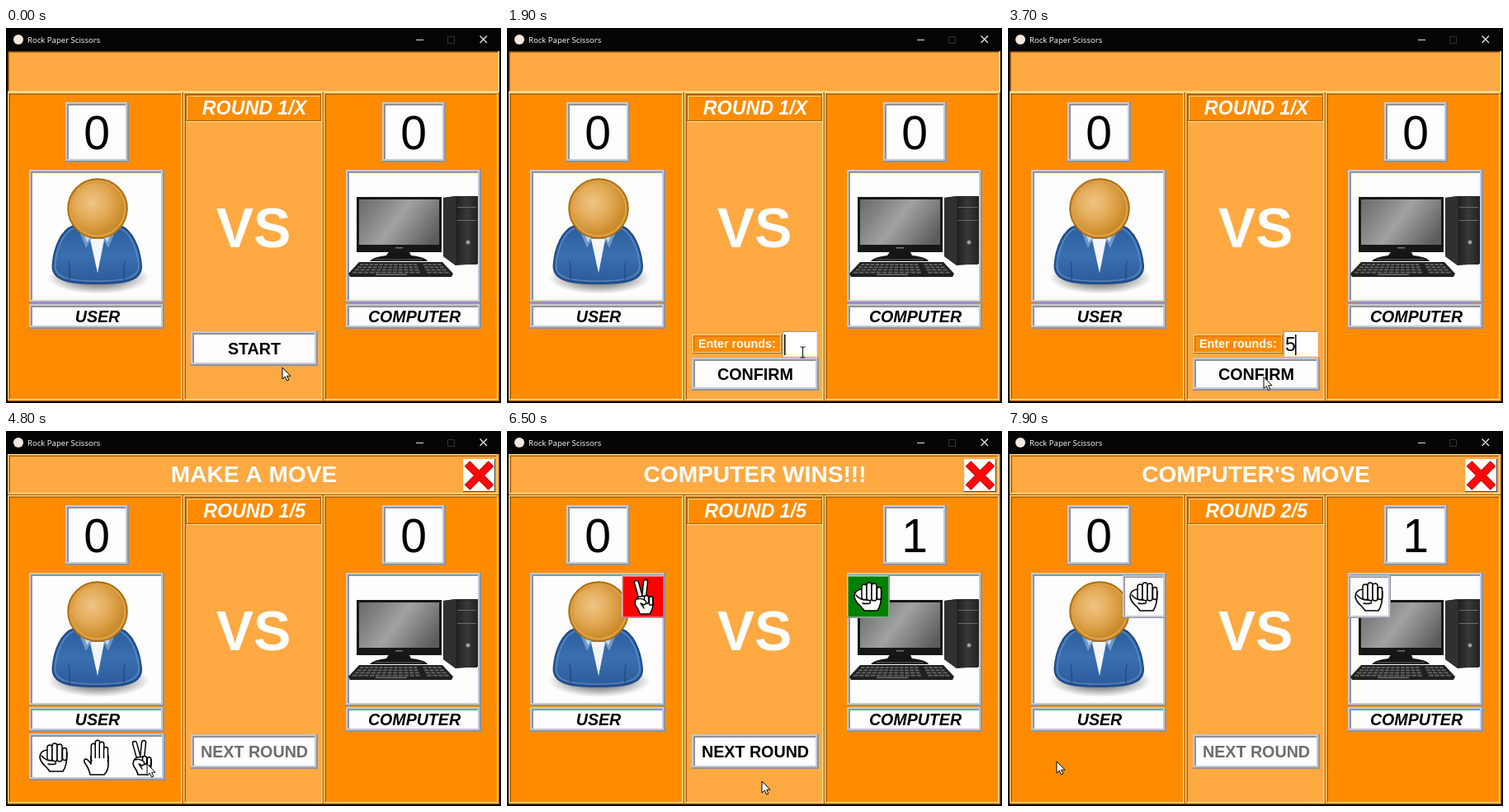
An HTML page with a canvas for the animation above (8000 ms loop, 600 by 455 pixels).

```html
<!DOCTYPE html>
<html lang="en">
<head>
<meta charset="utf-8">
<title>Rock Paper Scissors</title>
<style>
html, body { margin: 0; width: 100%; height: 100%; overflow: hidden; background: #000; }
canvas { display: block; width: 600px; height: 455px; }
</style>
</head>
<body>
<canvas id="stage" width="600" height="455"></canvas>
<script>
const ctx = document.getElementById('stage').getContext('2d');
const LOOP = 8000;
const SANS = '"Liberation Sans", Arial, sans-serif';
const DARK_ORANGE = '#ff8c00', ORANGE = '#ffa943';
const WARM = ['#ffe08f', '#a86000'], COOL = ['#c3c8d3', '#8f939d'];

// Moments at which the game changes
const T = { start: 800, focus: 1700, type: 2300, confirm: 3800, pick1: 5000, win: 6400, next: 7000, pick2: 7600 };

// Pointer path: time, x, y
const PATH = [
  [0, 335, 412], [300, 335, 411], [650, 324, 392], [900, 324, 390], [1100, 330, 386],
  [1500, 357, 390], [2300, 360, 397], [2900, 361, 397], [3450, 312, 423], [3950, 308, 424],
  [4500, 164, 401], [4800, 171, 404], [5100, 171, 404], [5600, 305, 426], [5800, 311, 426.5],
  [6400, 309, 425], [6600, 309, 425], [6850, 302, 394], [7050, 300, 394], [7450, 62, 399],
  [7650, 58, 400], [7900, 59, 401], [8000, 59, 401]
];

function rect(x, y, w, h, fill) {
  ctx.fillStyle = fill;
  ctx.fillRect(x, y, w, h);
}

function shape(d, fill, stroke, width = 1) {
  const p = new Path2D(d);
  if (fill) { ctx.fillStyle = fill; ctx.fill(p); }
  if (stroke) { ctx.strokeStyle = stroke; ctx.lineWidth = width; ctx.stroke(p); }
}

function disc(x, y, r, fill, stroke, width = 1) {
  ctx.beginPath();
  ctx.arc(x, y, r, 0, Math.PI * 2);
  if (fill) { ctx.fillStyle = fill; ctx.fill(); }
  if (stroke) { ctx.strokeStyle = stroke; ctx.lineWidth = width; ctx.stroke(); }
}

function text(s, x, y, font, fill, align = 'center') {
  ctx.font = font + ' ' + SANS;
  ctx.textAlign = align;
  ctx.fillStyle = fill;
  ctx.fillText(s, x, y);
}

function addStops(g, colors) {
  colors.forEach((c, i) => g.addColorStop(i / (colors.length - 1), c));
  return g;
}

const linear = (x0, y0, x1, y1, ...colors) => addStops(ctx.createLinearGradient(x0, y0, x1, y1), colors);
const radial = (x, y, r, ...colors) => addStops(ctx.createRadialGradient(x, y, 0, x, y, r), colors);

// One bevel step: first colour on top and left, second on bottom and right
function bevel(x, y, w, h, b, tl, br) {
  rect(x, y, w, b, tl);
  rect(x, y, b, h, tl);
  rect(x, y + h - b, w, b, br);
  rect(x + w - b, y, b, h, br);
}

function ridge(x, y, w, h, fill, [light, dark], b = 1) {
  rect(x, y, w, h, fill);
  bevel(x, y, w, h, b, light, dark);
  bevel(x + b, y + b, w - 2 * b, h - 2 * b, b, dark, light);
}

const whiteBox = (x, y, w, h) => ridge(x, y, w, h, '#fdfdfd', COOL, 2);

function finger(x1, y1, x2, y2, w = 7.5) {
  ctx.lineCap = 'round';
  for (const [color, width] of [['#000', w], ['#fff', w - 3]]) {
    ctx.strokeStyle = color;
    ctx.lineWidth = width;
    ctx.beginPath();
    ctx.moveTo(x1, y1);
    ctx.lineTo(x2, y2);
    ctx.stroke();
  }
}

const HANDS = [
  function rock() {
    shape('M-8 -9 Q-17 -8 -17 0 Q-16 6 -10 11 Q-7 14 -5 17 H11 Q16 10 16 -6 L4 -12Z', '#fff', '#000', 1.6);
    finger(-5, -12, -5, 1);
    finger(1, -14, 1, 2);
    finger(7, -13, 7, 2);
    finger(13, -9, 13, 1, 6.5);
    shape('M-15 -2 Q-10 4 -3 4 Q4 4 2 8 Q-3 9 -7 8', '#fff', '#000', 1.5);
  },
  function paper() {
    shape('M-8 21 Q-9 14 -15 6 Q-16 2 -13 2 Q-10 3 -7 8 V-2 H14 V8 Q14 16 9 21Z', '#fff', '#000', 1.6);
    finger(-4, -14, -4, 2, 7);
    finger(1, -18, 1, 2, 7);
    finger(6, -16, 6, 2, 7);
    finger(11, -10, 11, 3, 6.5);
    shape('M-5.5 1 H12.6 V10 H-5.5Z', '#fff');
  },
  function scissors() {
    finger(-8, -17, -3, 1, 6.5);
    finger(3, -18, 1, 1, 6.5);
    shape('M-5 0 Q-12 4 -9 11 Q-5 16 -4 21 H8 Q13 14 12 3 L4 -1Z', '#fff', '#000', 1.6);
    finger(4, 1, 4, 6, 6.5);
    finger(9.5, 2, 9.5, 8, 6);
    shape('M-7 3 Q-2 1 3 5 Q5 9 1 10 Q-1 9 -3 8 Q0 12 1 14', '#fff', '#000', 1.4);
  }
];

function hand(i, x, y) {
  ctx.save();
  ctx.translate(x, y);
  ctx.lineJoin = 'round';
  HANDS[i]();
  ctx.restore();
}

function card(x, i, fill) {
  ridge(x, 175, 52, 52, fill || '#fdfdfd', COOL, 1.5);
  if (fill) {
    rect(x + 1, 176, 50, 50, fill);
    ctx.setLineDash([1, 1]);
    ctx.strokeStyle = '#ddd';
    ctx.lineWidth = 1;
    ctx.strokeRect(x + 1.5, 176.5, 49, 49);
    ctx.setLineDash([]);
  }
  hand(i, x + 26, 201);
}

function titleBar() {
  rect(0, 0, 600, 455, '#050505');
  disc(15, 14, 6, '#f4e8df');
  ctx.font = '9.6px "Open Sans", "Noto Sans", sans-serif';
  ctx.textAlign = 'left';
  ctx.fillStyle = '#fff';
  ctx.fillText('Rock Paper Scissors', 26, 17.5);
  rect(497, 14, 9, 1, '#ddd');
  shape('M535.5 10.5h8v8h-8z', null, '#333');
  shape('M574.5 9.5l8.5 8.5M583 9.5l-8.5 8.5', null, '#eee', 1.2);
}

function person() {
  ctx.save();
  ctx.translate(112, 303);
  ctx.scale(1, .32);
  disc(0, 0, 62, radial(0, 0, 62, 'rgba(0,0,0,.55)', 'rgba(0,0,0,.4)', 'rgba(0,0,0,0)'));
  ctx.restore();

  ctx.lineJoin = 'round';
  shape('M82 240 C67 245 58 266 56.5 288 C56 306 75 310 110 310 C146 310 165 306 164 288 C162 266 153 245 138 240Z',
    linear(0, 242, 0, 310, '#2c5f9f', '#3a6fb0', '#2b5a99'), '#204a87', 2);
  shape('M82 243 C69 248 61 269 59.5 288 C59 303 76 307 110 307 C144 307 161 303 161 288 C159 269 151 248 138 243',
    null, 'rgba(114,159,207,.6)', 1.5);
  shape('M88 245 L97 267 L102 258 L111 297 L119 258 L124 267 L133 245Z', '#6f9aca');
  shape('M93 247 L98 260 L103 253Z M128 247 L123 260 L118 253Z', '#c5d5e8');
  shape('M102 256 H119 L111 297Z', '#f3f5f8');
  shape('M76 283 Q78 296 77 306 M144 283 Q142 296 143 306', null, 'rgba(25,60,115,.6)', 1.5);

  disc(111, 219, 36, '#c98420', '#a9690c', 1.5);
  disc(111, 219, 33.2, null, '#dda54e', 2);
  disc(111, 219, 32, radial(104, 212, 40, '#efc585', '#e3ab58', '#cb8a28'));
}

function computer() {
  shape('M530 206 L545 204 H572 V286 L545 288 L530 277Z', '#262626');
  shape('M530 206 L545 204 V288 L530 277Z', '#303030');
  rect(546, 205, 25, 82, linear(546, 0, 571, 0, '#202020', '#383838', '#242424'));
  for (const y of [217, 233]) rect(547, y, 23, 1, '#6c6c6c');
  disc(560, 260, 2.5, '#aaa', '#555');

  shape('M465 270 H488 L491 276 Q509 278 511 283 H441 Q444 278 461 276Z', '#151515');
  shape('M447 281 H505', null, '#666');
  rect(425, 205, 103, 67, '#171717');
  rect(428, 208, 97, 55, linear(430, 208, 510, 268, '#6c6c6c', '#858585', '#a2a2a2', '#808080', '#5c5c5c'));
  rect(472, 266, 9, 1.5, '#777');

  shape('M428 284 H529 L542 298 L540 302 H417 L415 298Z', '#202020');
  for (let r = 0; r < 4; r++) {
    const left = 429 - r * 3, step = (100 + r * 6) / 17;
    for (let k = 0; k < 17; k++)
      if (k !== 12) rect(left + k * step, 286 + r * 3.2, step - 1.4, 2, '#606060');
  }
  rect(448, 298.5, 38, 1.5, '#707070');
}

function player(x, name, score, portrait) {
  whiteBox(x + 44, 90, 77, 73);
  text(score, x + 82, 146.5, '57px', '#000');
  whiteBox(x, 172, 164, 162);
  portrait();
  whiteBox(x, 335, 164, 30);
  text(name, x + 83, 357, 'italic bold 19.6px', '#000');
}

function button(label, y, h, color = '#000') {
  whiteBox(224, y, 154, h);
  text(label, 301, y + h / 2 + 7, 'bold 19.7px', color);
}

function entry(t) {
  ridge(225, 372, 108, 23, DARK_ORANGE, WARM);
  text('Enter rounds:', 232, 388, 'bold 14.3px', '#fff', 'left');
  rect(334, 368, 42, 31, '#fff');
  bevel(334, 368, 42, 31, 1, '#999', '#e3e3e3');
  const typed = t >= T.type;
  if (typed) text('5', 336, 392, '23px', '#000', 'left');
  if (t >= T.focus && (t - T.focus) % 900 < 600) rect(typed ? 348 : 336, 372, 1.5, 25, '#000');
  button('CONFIRM', 400, 40);
}

function header(title) {
  rect(2, 28, 596, 50, ORANGE);
  if (!title) {
    bevel(2, 28, 596, 50, 1.5, '#6b3c00', WARM[0]);
    return;
  }
  ridge(2, 28, 596, 50, ORANGE, WARM, 1.5);
  text(title, 300.5, 62, 'bold 28.1px', '#fff');
  rect(554, 34, 39, 40, '#fff');
  bevel(554, 34, 39, 40, 1, '#eee', '#444');
  ctx.lineCap = 'butt';
  shape('M559 39.5L588 68.5M588 39.5L559 68.5', null, '#b80000', 9.5);
  shape('M559.5 40L587.5 68M587.5 40L559.5 68', null, '#fb0909', 8);
}

function pointer(t) {
  const i = PATH.findIndex(p => p[0] > t);
  const [t0, x0, y0] = PATH[i - 1], [t1, x1, y1] = PATH[i];
  const k = (t - t0) / (t1 - t0), e = k * k * (3 - 2 * k);
  const x = x0 + (x1 - x0) * e, y = y0 + (y1 - y0) * e;
  ctx.save();
  ctx.translate(x, y);
  ctx.lineCap = 'butt';
  const overEntry = t > T.start && t < T.confirm && x > 334 && x < 376 && y < 399;
  if (overEntry) shape('M-3 -6.5H-1L0 -5.5L1 -6.5H3M0 -5.5V5.5M-3 6.5H-1L0 5.5L1 6.5H3', null, '#222', 1.2);
  else shape('M0 0V14L3.3 11L5.6 16L7.8 15L5.6 10.2H10Z', '#fff', '#000', 1);
  ctx.restore();
}

function draw(t) {
  const playing = t >= T.confirm;
  const second = t >= T.next;
  const pickTime = second ? T.pick2 : T.pick1;
  const picked = t >= pickTime;
  const won = t >= T.win && !second;
  const title = !playing ? '' : won ? 'COMPUTER WINS!!!' : picked ? "COMPUTER'S MOVE" : 'MAKE A MOVE';

  titleBar();
  header(title);
  ridge(2, 78, 213, 375, DARK_ORANGE, WARM, 1.5);
  ridge(215, 78, 170, 375, ORANGE, WARM, 1.5);
  ridge(385, 78, 213, 375, DARK_ORANGE, WARM, 1.5);
  ridge(218, 81, 165, 33, DARK_ORANGE, [WARM[1], WARM[0]]);
  text('ROUND ' + (second ? 2 : 1) + '/' + (playing ? 5 : 'X'), 301, 105, 'italic bold 23.2px', '#fff');
  text('VS', 300, 265.5, 'bold 68px', '#fff');

  player(28, 'USER', 0, person);
  player(412, 'COMPUTER', t >= T.win ? 1 : 0, computer);

  if (t < T.start) button('START', 368, 42);
  else if (!playing) entry(t);
  else button('NEXT ROUND', 368, 42, won ? '#000' : '#6d6d6d');

  if (playing && !picked) {
    whiteBox(28, 367, 165, 57);
    [58, 110, 164].forEach((x, i) => hand(i, x, 396));
  }
  if (picked) {
    const roll = Math.floor((t - pickTime) / 100) % 3;
    card(139, second ? 0 : 2, won && '#ff0000');
    card(412, won ? 0 : roll, won && '#008000');
  }
  pointer(t);
}

const begin = performance.now();
function tick() {
  draw((performance.now() - begin) % LOOP);
  requestAnimationFrame(tick);
}
tick();
</script>
</body>
</html>
```
